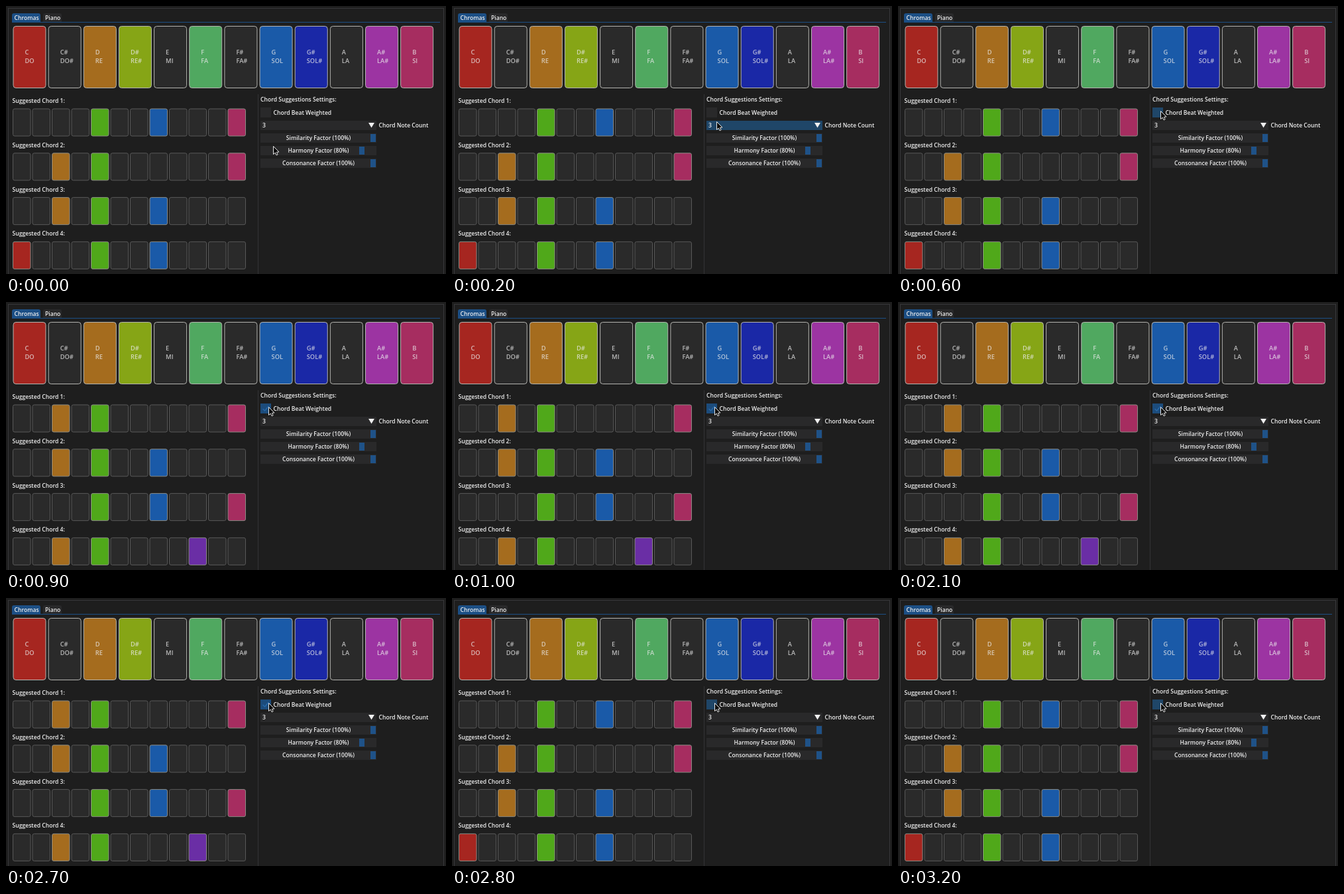
An HTML page with a canvas that plays this animation: 664 px wide and 404 px high, repeating every 3700 ms.

```html
<!DOCTYPE html>
<html lang="en">
<head>
<meta charset="utf-8">
<title>Chord suggestions</title>
<style>
html, body { margin: 0; width: 100%; height: 100%; overflow: hidden; background: #1e1e1e; }
canvas { display: block; }
</style>
</head>
<body>
<canvas id="stage" width="664" height="404"></canvas>
<script>
const ctx = document.getElementById('stage').getContext('2d');
const LOOP = 3700, CHECK_ON = 800, CHECK_OFF = 2800;
const DARK = '#2a2a2a', FRAME = '#29292a', BLUE = '#1c4f85', HOVER = '#1f4668';

const keys = [
  ['C', 'DO', '#a62620'], ['C#', 'DO#', DARK], ['D', 'RE', '#a56c1e'],
  ['D#', 'RE#', '#86a516'], ['E', 'MI', DARK], ['F', 'FA', '#50a860'],
  ['F#', 'FA#', DARK], ['G', 'SOL', '#1a5aa8'], ['G#', 'SOL#', '#1a28a6'],
  ['A', 'LA', DARK], ['A#', 'LA#', '#9c34a2'], ['B', 'SI', '#a62d60']
];
const noteColors = { 0: '#a62620', 2: '#a56c1e', 4: '#50a81a', 7: '#1a5aa8', 9: '#6a2ea5', 11: '#a62d60' };
const plainChords = [[4, 7, 11], [2, 4, 11], [2, 4, 7], [0, 4, 7]];
const weightedChords = [[2, 4, 11], [2, 4, 7], [4, 7, 11], [2, 4, 9]];
const sliders = [['Similarity Factor (100%)', 192, 550], ['Harmony Factor (80%)', 211, 533], ['Consonance Factor (100%)', 230, 550]];

// Pointer tip, one position per 100 ms
const pointer = [[403, 211], [401, 190], [399, 174], [398, 166], [397, 161], [396, 159], [396, 158]];

function rect(x, y, w, h, fill) {
  ctx.fillStyle = fill;
  ctx.fillRect(x, y, w, h);
}

function box(x, y, w, h, r, fill, line) {
  ctx.beginPath();
  ctx.roundRect(x, y, w, h, r);
  ctx.fillStyle = fill;
  ctx.fill();
  if (line) {
    ctx.strokeStyle = line;
    ctx.lineWidth = 1;
    ctx.stroke();
  }
}

function poly(points, fill, line) {
  ctx.beginPath();
  points.forEach(([x, y]) => ctx.lineTo(x, y));
  ctx.closePath();
  ctx.fillStyle = fill;
  ctx.fill();
  if (line) {
    ctx.strokeStyle = line;
    ctx.lineWidth = 1;
    ctx.stroke();
  }
}

function text(str, x, midY, { size = 8.6, color = '#f0f0f0', align = 'left' } = {}) {
  ctx.font = `600 ${size}px "Open Sans", "Noto Sans", sans-serif`;
  ctx.textAlign = align;
  ctx.fillStyle = color;
  ctx.fillText(str, x, midY + size * 0.36);
}

function drawWindow() {
  rect(0, 0, 664, 404, '#1e1e1e');
  rect(3, 3, 658, 1, '#38383a');
  rect(3, 3, 1, 401, '#38383a');
  rect(660, 3, 1, 401, '#38383a');
  box(9, 11, 43, 13, [3, 3, 0, 0], BLUE);
  box(56, 11, 28, 13, [3, 3, 0, 0], FRAME);
  rect(9, 24, 646, 1, BLUE);
  text('Chromas', 12.5, 17.5);
  text('Piano', 59, 17.5);
  rect(380, 133, 1, 271, '#343436');
}

function drawKeys() {
  keys.forEach(([letter, name, color], i) => {
    const x = 11 + i * 53.15;
    box(x, 30.5, 49, 93, 4, color, '#b4b4b0');
    const style = { size: 9.3, color: 'rgba(235,235,235,.75)' };
    text(letter, x + 17.5, 70, style);
    text(name, x + 17.5, 83, style);
  });
}

function drawChords(chords) {
  chords.forEach((notes, row) => {
    const y = row * 66.8;
    text(`Suggested Chord ${row + 1}:`, 9.5, 143 + y);
    for (let i = 0; i < 12; i++) {
      const lit = notes.includes(i);
      box(10.5 + i * 29.5, 155 + y, 26.5, 41, 2.5, lit ? noteColors[i] : DARK, lit ? '#8a8a84' : '#585858');
    }
  });
}

function drawSettings(checked, py) {
  const hover = (y, h) => py >= y && py < y + h ? HOVER : FRAME;
  text('Chord Suggestions Settings:', 384, 141);

  rect(384, 153, 16, 15, checked ? '#1c4c7c' : hover(153, 15));
  if (checked) {
    ctx.beginPath();
    ctx.moveTo(387.5, 161);
    ctx.lineTo(390.5, 164);
    ctx.lineTo(396.5, 157);
    ctx.strokeStyle = '#2868a8';
    ctx.lineWidth = 1.5;
    ctx.stroke();
  }
  text('Chord Beat Weighted', 403.5, 160.5);

  rect(384, 173, 175, 14, hover(173, 14));
  text('3', 387, 180);
  poly([[547, 176], [556, 176], [551.5, 183.5]], '#f0f0f0');
  text('Chord Note Count', 562.5, 180);

  for (const [label, y, grab] of sliders) {
    rect(384, y, 175, 14, FRAME);
    rect(grab, y + 1, 8, 12, '#1f5288');
    text(label, 471.5, y + 7, { align: 'center' });
  }
}

function drawPointer([x, y]) {
  const shape = [[0, 0], [0, 12], [2.8, 9.6], [4.6, 13.4], [6.6, 12.4], [4.9, 8.8], [8.5, 8.5]];
  poly(shape.map(([dx, dy]) => [x + 0.5 + dx, y + 0.5 + dy]), '#080808', '#e8e8e8');
}

function draw(now) {
  const t = now % LOOP;
  const checked = t >= CHECK_ON && t < CHECK_OFF;
  const tip = pointer[Math.min(Math.floor(t / 100), pointer.length - 1)];
  drawWindow();
  drawKeys();
  drawChords(checked ? weightedChords : plainChords);
  drawSettings(checked, tip[1]);
  drawPointer(tip);
}

const start = performance.now();
function tick() {
  draw(performance.now() - start);
  requestAnimationFrame(tick);
}
tick();
</script>
</body>
</html>
```
